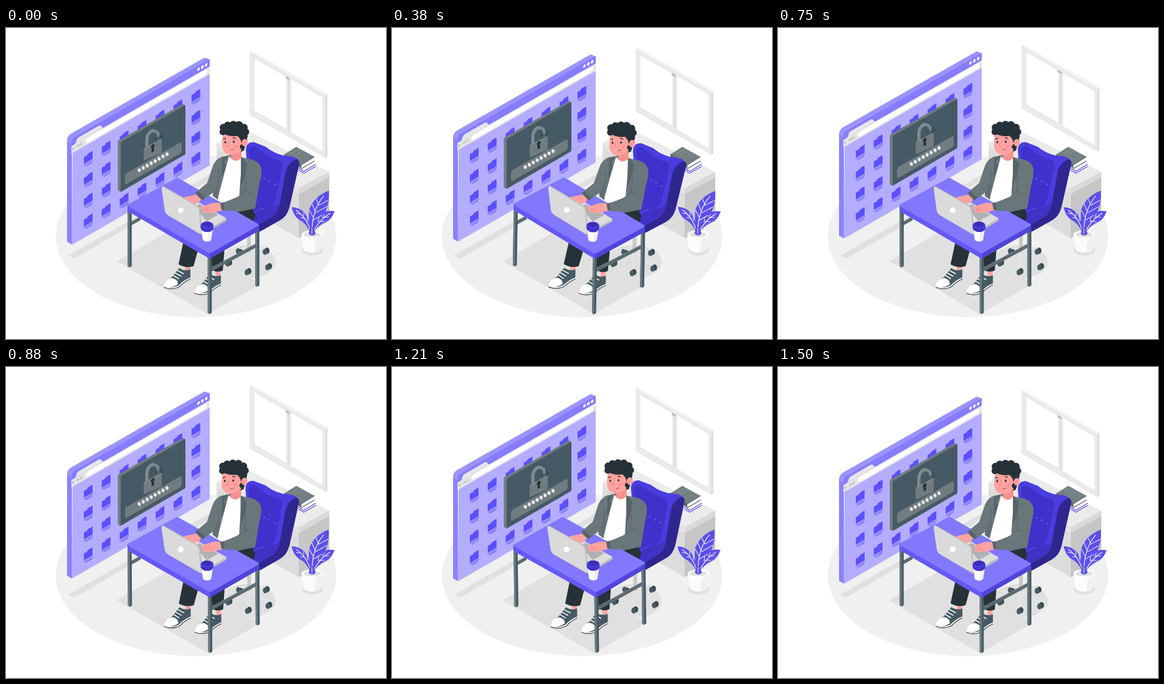
An HTML page that plays this animation: 610x500 px, repeating every 1.54 s.

```html
<!DOCTYPE html>
<html lang="en">
<head>
<meta charset="utf-8">
<title>Locked files</title>
<style>
html, body { margin: 0; width: 100%; height: 100%; overflow: hidden; background: #fff; }
svg { display: block; width: 610px; height: 500px; }
.line { fill: none; stroke-linecap: round; stroke-linejoin: round; }
</style>
</head>
<body>
<svg id="stage" viewBox="0 0 610 500" xmlns="http://www.w3.org/2000/svg"></svg>
<script>
const poly = (pts, fill) => `<polygon points="${pts}" fill="${fill}"/>`;
const path = (d, fill) => `<path d="${d}" fill="${fill}"/>`;
const line = (d, color, w = 1) => `<path class="line" d="${d}" stroke="${color}" stroke-width="${w}"/>`;
const oval = (x, y, rx, ry, fill) => `<ellipse cx="${x}" cy="${y}" rx="${rx}" ry="${ry}" fill="${fill}"/>`;
const move = (x, y, s) => `<g transform="translate(${x} ${y})">${s}</g>`;
const group = (id, s) => `<g id="${id}">${s}</g>`;
const list = (n, fn) => Array.from({ length: n }, (_, i) => fn(i)).join('');
// Wall plane: x runs along the 30 degree slope, y stays vertical
const wall = (x, y, s) => `<g transform="matrix(1 -.577 0 1 ${x} ${y})">${s}</g>`;

const DARK = '#263238', SLATE = '#455a64', JACKET = '#69777b', SKIN = '#ffa3a0', WHITE = '#fff';

function floor() {
  return oval(305, 335, 225, 130, '#f0f0f0')
    + poly('100,366 333,232 341,237 109,371', '#e0e0e0')
    + poly('178,375 275,319 408,412 324,460', '#e0e0e0')
    + oval(388, 376, 45, 27, '#e0e0e0')
    + oval(492, 357, 17, 9, '#e0e0e0');
}

function casement() {
  return poly('391,39 394,37 516,106 516,207 513,209 391,139', '#e0e0e0')
    + poly('391,40 512,109 512,208 391,138', '#ebebeb')
    + poly('391,39 394,37 516,106 513,109', '#f3f3f3')
    + poly('398,49 450,79 450,163 398,133', WHITE)
    + poly('457,82 508,112 508,199 457,168', WHITE)
    + line('M398 49V133L450 163M457 82V168L508 199', '#dedede', .8)
    + line('M453.5 82V164', '#dcdcdc', 2)
    + poly('449,77 456,81 455,84 449,81', '#bdbdbd');
}

function folder(c, r) {
  return move(20 + 28.8 * c, 30.2 + 33.5 * r,
    path('M0 2H5L6.5 0H14V13H0Z', '#5c4fff')
    + line('M.5 15.2H14M3 18H13', '#5c4fff', 1.1));
}

function browser() {
  const front = path('M2 -7Q3 -9 6 -9H222V162H1Z', '#b4adff')
    + path('M0 3V-4Q0 -9 5 -9H222V3Z', '#857cff')
    + path('M0 3H222V15H0Z', '#e6e6e6')
    + path('M4 3Q7 3 8 -1Q9 -4.5 13 -4.5H43Q47 -4.5 48 -1L50 2Q51 3 54 3Z', '#e6e6e6')
    + '<rect x="23" y="4.5" width="195" height="8" rx="4" fill="#fff"/>'
    + line('M5.5 8.5H1.5M3 6.8L1.3 8.5L3 10.2M8 8.5H12M10.5 6.8L12.2 8.5L10.5 10.2', '#a8a8a8', .8)
    + line('M18 7A2.2 2.2 0 1 0 18.3 9.6', '#a8a8a8', .8)
    + list(3, i => oval(204 + 6.2 * i, -3, 2.1, 2.5, WHITE))
    + list(28, i => folder(i % 7, Math.floor(i / 7)));
  return path('M98 181Q98 174 104 170L317 48.5Q320 47 322 48.5L327 51V60L106 188V348L98 343.5Z', '#9b94ff')
    + path('M98 182L105 186V348L98 343.5Z', '#8b82ff')
    + wall(105, 187, front);
}

function star(i) {
  return move(214 + 6.35 * i, 228.6 - 3.67 * i,
    line('M0 -3V3M-2.3 -.2L2.3 .2M-1.8 -2.1L1.8 2.1M-2 1.6L2 -1.6', WHITE, 1.1));
}

function lockPanel() {
  return path('M179.5 183Q180 181 182 180L284 122L288 124.5V203L184 264L179.5 261Z', '#707c80')
    + path('M184 186Q184 183.5 186 182.5L286 125Q288 124 288 126V201Q288 203 286 204L186 262Q184 263.5 184 261Z', SLATE)
    + path('M191 238Q191 235 194 233L279 184.5Q282 183 282 186V197Q282 200 279 202L194 250.5Q191 252 191 249Z', '#717c81')
    + line('M226.5 192V180C226.5 170 233 164.5 238.5 165.5C243 166.5 245 170 245 175V177', '#7e898d', 4.6)
    + line('M224.4 192V180C224.4 170 230.5 163.5 236 163', '#96a0a3', 1)
    + line('M240.5 179L252 172', SLATE, 2.2)
    + line('M239.5 177.5L242 177M245.5 178H249M247 175L252 174.5M246 172L250 170', DARK, .9)
    + path('M221 195.5Q221 193.5 223 192.5L248 179Q250 178 250 180V198.5Q250 200 248.5 201L223 212.5Q221 213.5 221 211.5Z', '#717c80')
    + line('M221.6 194.5L249 179.5', '#8d979b', .9)
    + path('M235.5 187C239 185.5 239.4 190 237.2 192L238 198L233.6 200L234 194C231.5 193 232.5 188.3 235.5 187Z', DARK)
    + list(8, star);
}

function cabinet() {
  return poly('338,185 380,161 519,231 470,258', '#ebebeb')
    + poly('338,185 470,258 470,338 338,262', '#dcdcdc')
    + poly('470,258 519,231 519,310 470,338', '#c6c6c6')
    + poly('338,185 470,258 470,267 338,194', '#e3e3e3')
    + poly('470,258 519,231 519,240 470,267', '#d9d9d9');
}

function books() {
  return poly('469,224 478,220 497,215 497,222 478,234 469,228', '#f5f5f5')
    + line('M469 225L478 230.5L497 219M470 228.5L478 233.5L497 222.5', '#5548e8', 1.1)
    + poly('447,203 474,220 474,226 447,209', '#5d686c')
    + poly('474,220 494,208 494,214 474,226', '#f5f5f5')
    + poly('447,203 466,191 495,207 474,220', '#758084')
    + line('M447 203L474 220L495 207M474 226.3L495 214', '#59666b', 1.2)
    + line('M458 202L471 194.5M463 205L476 197.5', '#8d979a', 1);
}

function plant() {
  const leaf = d => path(d, '#5c4fec');
  return leaf('M491 331Q484 309 487 291Q494 271 518 261.5Q520 285 510 300Q500 313 492 331Z')
    + leaf('M490 331Q489 310 480 298Q471 288 458.5 288Q461 301 470 308Q482 313 490 331Z')
    + leaf('M492 331Q495 308 503 300Q513 292 527.5 294.5Q523 308 513 312Q501 317 492 331Z')
    + line('M491 330Q491 292 510 270M490 330Q484 306 466 293M492 330Q503 308 520 298', WHITE, 1.1)
    + line('M493 304L487 293M496 294L491 282M502 284L498 275M493 309L507 301M497 297L515 287M502 285L517 277', WHITE, 1)
    + line('M484 310L484 303M478 303L478 297M480 306L473 305M473 299L466 298', WHITE, .9)
    + line('M501 312L502 305M508 305L511 299M502 311L511 311M510 304L518 304', WHITE, .9)
    + path('M474.5 332L477 355Q480 361 492 361Q503 361 506 355L508.5 332Z', '#fbfbfb')
    + path('M497 338L508 332L505.5 355Q503 360 495 361Z', '#f0f0f0')
    + oval(491.5, 331.5, 17, 6, WHITE)
    + oval(491.5, 332, 14, 4.3, '#e0e0e0')
    + path('M486 331Q491 336 497 331L494 320H488Z', '#5c4fec')
    + line('M491 331V322', WHITE, 1);
}

function chair() {
  const wheel = (x, y) => oval(x + 2, y - 1, 4, 5, '#37474f') + oval(x - 1.2, y + .8, 3.8, 4.8, SLATE);
  return wheel(374, 358) + wheel(417, 359) + wheel(357, 378)
    + line('M389 358L374 353M389 358L416 353M389 358L419 378M389 358L388 388M389 358L358 372', '#e4e4e4', 3.4)
    + line('M390 325V358', '#c9c9c9', 6)
    + wheel(421, 384) + wheel(388, 392)
    // Outer wing, padded rim, seat back
    + path('M385 197Q385 183 398 183.5L417 191Q436 206 457 206Q468 208 471 216L469 226L455 288Q451 303 440 309L408 327Q397 331 397 319L390 262Z', '#4a3de0')
    + path('M471 216L469 226L455 288Q451 303 440 309L408 327Q400 331 397 321L428 303Q436 298 439 285L449 231Q452 217 466 211Q470 212 471 216Z', '#30268f')
    + path('M390 196Q396 186 405 194Q421 209 437 212Q446 214 443 226L432 277Q430 287 421 289L399 293Z', '#3f31cb')
    + path('M397 297Q405 286 414 290L426 288Q435 286 439 279L437 291Q434 300 428 303L398 320Z', '#3f32c4')
    + line('M399 297Q407 289 414 291', '#5d50f2', 1.3)
    + line('M414 242L416 243M422 246L424 247.5M431 251L433 252.5', '#685df0', 1.6);
}

function shoe() {
  return path('M253 412Q255 405 266 401L278 386Q287 392 296 388V402Q286 407 278 415Q264 421 254 416Z', SLATE)
    + path('M253 412Q257 402 267 402Q276 404 276 412Q264 420 254 415Z', WHITE)
    + line('M253.5 415Q264 421 277 415Q286 406 296 402', WHITE, 1.6)
    + line('M253.5 417Q265 422 278 416.5Q286 408 296 403.5', '#37474f', 1.1)
    + line('M269 398L277 403M272 394L281 399M275.5 390L285 395', WHITE, 1.5);
}

function legs() {
  return poly('287,380 296,382 295,389 288,391', SKIN)
    + poly('336,388 345,389 344,398 337,400', SKIN)
    + shoe() + move(49, 9.5, shoe())
    + path('M286 338L311 347L301 383Q289 387 277 380Z', DARK)
    + path('M327 352H351L348 390Q338 394 331 389Z', DARK)
    + path('M350 281L394 286L400 300L396 318L350 300Z', DARK);
}

function torso() {
  return path('M347 208L360 204L379 208L397 212Q409 219 410 232L400 290L372 296L339 278Z', JACKET)
    + path('M358 206Q366 216 377 208L377 240L374 291L339 278L347 247Z', WHITE)
    + path('M357 205L349 213L345 236L340 276L332 270L334 223Q337 210 347 207Z', '#626f73')
    + path('M378 207L387 218L385 226L388 229L377 254L373 291L377 235Z', '#566469')
    + path('M358 205L350 215L353 222L347 240L343 229L347 210Z', '#566469');
}

function head() {
  const curls = [[349, 160, 6], [356, 156.5, 6], [365, 155.5, 6.3], [374, 156, 6.3], [382, 160, 6],
    [385, 167, 5.5], [383, 174, 5], [348, 167, 5.2], [379.5, 191, 4.2]];
  return path('M362 196L378 189V208Q370 218 361 210Z', '#f8918f')
    + path('M378 187L385 183L382 197L377 199Z', DARK)
    + path('M348 171L346.5 189Q348 203 360 204Q371 204 378 196L382 170Z', SKIN)
    + oval(366, 165, 19, 9, DARK)
    + curls.map(c => oval(c[0], c[1], c[2], c[2], DARK)).join('')
    + path('M372 170H387V183L378 185Q377 178 372 174Z', DARK)
    + oval(383.5, 184.5, 5, 6, SKIN)
    + line('M381.5 187Q382 182 386 182', '#e87e7f', .9)
    + oval(352, 183.5, 1.4, 1.9, DARK) + oval(365.5, 183, 1.4, 1.9, DARK)
    + line('M349 178.3L352.5 177.5M364.5 176.3L368.5 177.3', DARK, 1.3)
    + line('M357.5 183L355.5 190L358 190.5', '#e87e7f', .9)
    + line('M361 195.8Q363.5 196.5 366 194.8', '#9e4350', 1)
    + oval(369, 190, 3, 2.3, '#ff918f');
}

function desk() {
  const post = (x, y, h) => poly(`${x},${y} ${x + 6.5},${y} ${x + 6.5},${y + h - 2} ${x + 3},${y + h} ${x},${y + h - 2}`, SLATE)
    + poly(`${x},${y} ${x + 3.2},${y} ${x + 3.2},${y + h} ${x},${y + h - 2}`, '#6b7a7f');
  return poly('200,312 216,303 216,309 200,318', '#5b6a70')
    + poly('329,386 401,347 401,353 329,392', '#5b6a70')
    + line('M329 386L401 347', '#7b888c', 1)
    + post(195.3, 290, 95) + post(400.2, 322, 94) + post(323.8, 362, 98)
    + path('M195 284L327 361V371L196 295Q195 294 195 292Z', '#6558f5')
    + path('M327 361L406 316V326L327 371Z', '#5044db')
    + path('M197 283L274 241Q275.5 240.5 277 241.5L405 315Q407 316.5 405 318L329 361.5Q327 362.5 325 361.5L196.5 287Q194 285 197 283Z', '#8178ff');
}

function laptopBase() {
  return poly('259,299 300,277 354,307 354,310 316,332', '#bdbdbd')
    + poly('259,297 300,275 354,306 315,329', '#dedede')
    + poly('303,287 311,283 341,300 322,311', '#aeb2b4');
}

function arms() {
  return path('M305 268Q297 270 290 271Q284 272 285 275Q292 276 294 280Q303 286 311 279L315 272Z', SKIN)
    + path('M347 207Q335 211 331 225L323 249L304 265Q309 273 316 277L336 262Q346 245 347 224Z', JACKET)
    + line('M341 228Q345 241 336 261', '#566469', 1)
    + path('M305 265L308 262L320 273L315 277Z', '#566469')
    + path('M350 283Q335 279 327 283L312 288Q313 291 318 291Q314 294 317 297L334 297L350 292Z', SKIN)
    + line('M318 291L327 289M318 294L329 293', '#e87e7f', .8)
    + path('M391 212Q406 212 410 226Q411 240 405 254Q400 265 400 276Q400 286 391 288L372 293Q358 296 346 292L345 282L372 272Q383 266 384 261L384 235Z', JACKET)
    + line('M385 238L384 261Q379 270 363 276M384 262L392 265', '#566469', 1)
    + path('M344 282L349 280L351 293L346 292Z', '#566469');
}

function laptopLid() {
  return path('M250 258Q250 253 254 255L308 286Q311 288 311.5 292L316 330L312 332L260 301Q256 298 255 294Z', '#bfbfbf')
    + path('M250 258Q250 254.5 253 256L306 287Q309 289 309.5 293L313 331L260 301Q256 298 255 294Z', '#dadada')
    + oval(280.5, 293, 4.6, 4.6, WHITE);
}

function cup() {
  return path('M313 321L316 341Q322.5 346 329 341L332.5 321Z', WHITE)
    + path('M325 326L332 322L329 341Q327 343 324 343.5Z', '#f0f0f0')
    + path('M312.5 317V322Q315 328 323 328Q331 328 333 322V317Z', '#4033c9')
    + oval(322.7, 317, 10.2, 5.7, '#493bd9')
    + oval(322.7, 315.5, 7.8, 4.2, '#3a2eb8');
}

const stage = document.getElementById('stage');
stage.innerHTML = floor()
  + group('window', casement())
  + group('screen', browser() + lockPanel())
  + cabinet() + books()
  + group('worker', chair() + legs() + torso() + head() + desk() + laptopBase() + arms() + laptopLid() + cup())
  + group('plant', plant());

const LOOP = 1540, STEPS = 37, CYCLE = 36, LIFT = 10;
const get = id => document.getElementById(id);
const floating = [get('window'), get('screen')];
const worker = get('worker'), leaves = get('plant');

// Triangle wave: 0, 1, 0, -1, 0 over one unit
const sway = p => p < .25 ? 4 * p : p < .75 ? 2 - 4 * p : 4 * p - 4;

function draw(ms) {
  const step = Math.min(STEPS - 1, Math.floor((ms % LOOP + 4) / (LOOP / STEPS)));
  const p = step / CYCLE % 1;
  const rise = LIFT * (1 - Math.abs(1 - 2 * p));
  for (const el of floating) el.setAttribute('transform', `translate(0 ${-rise})`);
  worker.setAttribute('transform', `rotate(${sway(p)} 301 304)`);
  leaves.setAttribute('transform', `rotate(${sway(p)} 493 311)`);
}

const start = performance.now();
function tick() {
  draw(performance.now() - start);
  requestAnimationFrame(tick);
}
draw(0);
requestAnimationFrame(tick);
</script>
</body>
</html>
```
